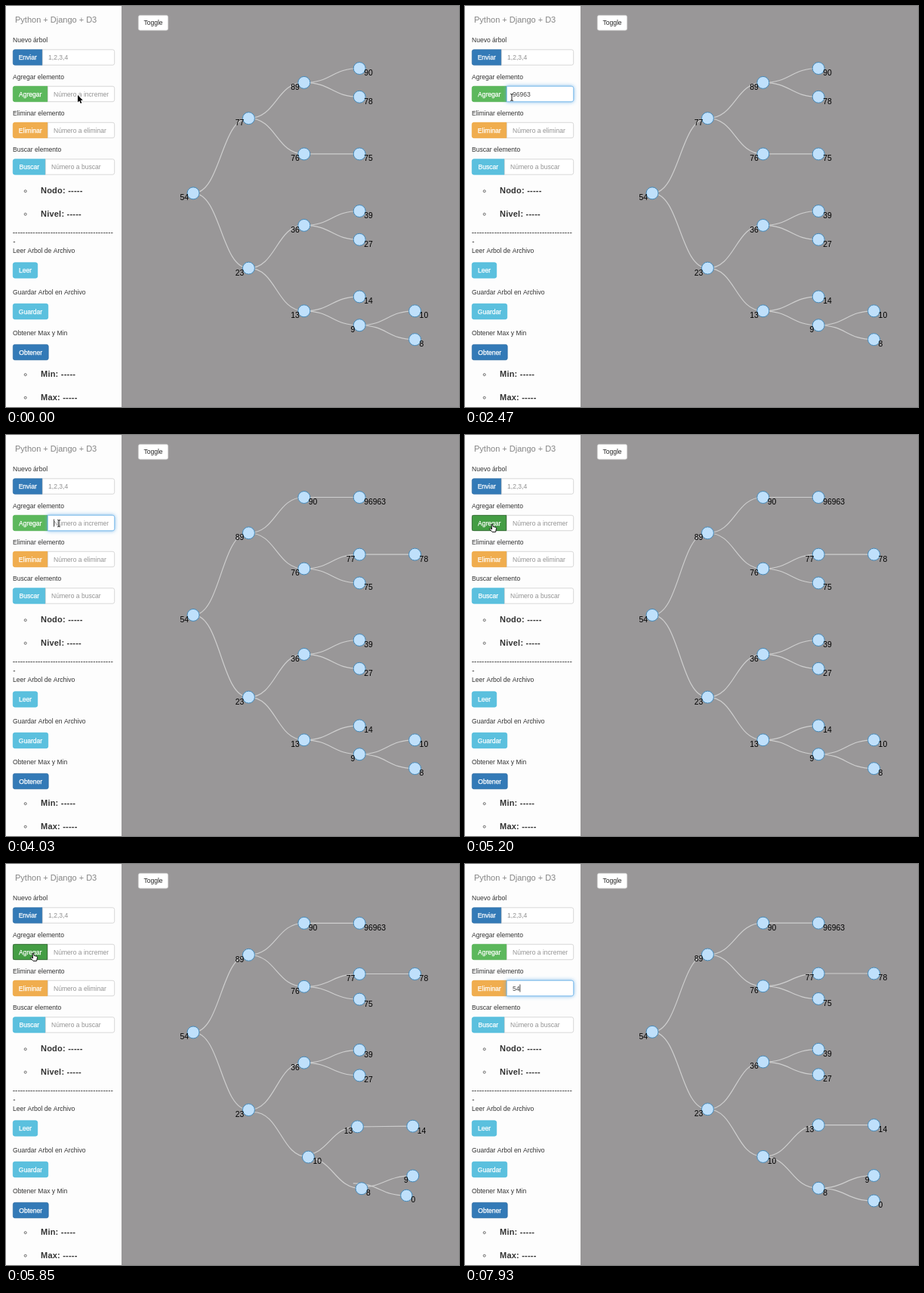
An HTML page with a canvas that plays this animation: 600 by 531 pixels, repeating every 8000 ms.

```html
<!DOCTYPE html>
<html lang="es">
<head>
<meta charset="utf-8">
<title>Árbol binario</title>
<style>
html, body { margin: 0; width: 100%; height: 100%; overflow: hidden; background: #999798; }
canvas { display: block; width: 600px; height: 531px; }
</style>
</head>
<body>
<canvas id="stage"></canvas>
<script>
const W = 600, H = 531, LOOP = 8000, STEP = 130;
const FONT = '"Liberation Sans", Arial, sans-serif';
const SMALL = `8.56px ${FONT}`;
const canvas = document.getElementById('stage');
const ctx = canvas.getContext('2d');
const ratio = window.devicePixelRatio || 1;
canvas.width = W * ratio;
canvas.height = H * ratio;

// Trees: [name, ...children]; a leaf carries its slot on the vertical axis.
const upper = ['89', ['90', ['96963', 0]], ['76', ['77', ['78', 2]], ['75', 3]]];
const middle = ['36', ['39', 5], ['27', 6]];
const lower = ['13', ['14', 8], ['9', ['10', 8.5], ['8', 9.5]]];
const layouts = [
  ['54', ['77', ['89', ['90', 0], ['78', 1]], ['76', ['75', 3]]], ['23', middle, lower]],
  ['54', upper, ['23', middle, lower]],
  ['54', upper, ['23', middle, ['10', ['13', ['14', 8]], ['8', ['9', 10], ['0', 11]]]]]
].map(layoutTree);
const updates = [2704, 5259], DURATION = 750;
const entry = { x: 248, y: 262 };
const leftLabels = new Set(['54', '77', '89', '76', '23', '36', '13', '9']);

function layoutTree(root) {
  const nodes = {};
  let last = 0;
  (function place([name, ...kids], depth, parent) {
    let slot = kids[0];
    if (typeof slot !== 'number') {
      const slots = kids.map(k => place(k, depth + 1, name));
      slot = (slots[0] + slots[slots.length - 1]) / 2;
    }
    last = Math.max(last, slot);
    nodes[name] = { x: 248 + depth * 73.4, slot, parent };
    return slot;
  })(root, 0, null);
  for (const n of Object.values(nodes)) n.y = 44.7 + (n.slot + 1) * 434.7 / (last + 2);
  return nodes;
}

// Form state: [time, focused part, text, focus glow]
const formStates = [
  [0, '', '', false],
  [1040, 'add', '', true],
  ...[1, 2, 3, 4, 5].map(n => [1300 + n * 130, 'add', '96963'.slice(0, n), true]),
  [2730, 'button', '', false],
  [3770, 'add', '', true],
  [4160, 'add', '0', true],
  [5200, 'button', '', false],
  [6630, 'del', '', false],
  [6760, 'del', '', true],
  [7280, 'del', '5', true],
  [7670, 'del', '54', true]
];

// Pointer path: [time, x, y, shape]
const pointerPath = [
  [0, 95, 118, 'arrow'], [390, 95, 118, 'arrow'], [520, 94, 119, 'beam'],
  [780, 92, 119, 'beam'], [1040, 62, 121, 'beam'], [2470, 62, 121, 'beam'],
  [2600, 52, 120, 'hand'], [2730, 42, 120, 'hand'], [3380, 42, 120, 'hand'],
  [3510, 45, 120, 'hand'], [3640, 59, 118, 'beam'], [3770, 70, 117, 'beam'],
  [4420, 70, 117, 'beam'], [4550, 65, 118, 'beam'], [4680, 49, 118, 'hand'],
  [4810, 36, 118, 'hand'], [6110, 36, 118, 'hand'], [6240, 44, 129, 'arrow'],
  [6370, 62, 146, 'arrow'], [6500, 77, 162, 'beam'], [7150, 77, 162, 'none']
];

const lerp = (a, b, p) => a + (b - a) * p;
const mix = (a, b, p) => ({ x: lerp(a.x, b.x, p), y: lerp(a.y, b.y, p) });
const ease = t => t < 0.5 ? 4 * t ** 3 : 1 - 4 * (1 - t) ** 3;
const lastIndex = (list, t) => list.reduce((at, item, i) => item[0] <= t ? i : at, 0);

function text(str, x, y, color, { font = SMALL, align = 'left', spacing = 0, weight = 0 } = {}) {
  ctx.font = font;
  ctx.textAlign = align;
  ctx.letterSpacing = spacing + 'px';
  ctx.fillStyle = color;
  ctx.fillText(str, x, y);
  if (weight) {
    ctx.lineWidth = weight;
    ctx.strokeStyle = color;
    ctx.strokeText(str, x, y);
  }
  ctx.letterSpacing = '0px';
}

function box(x, y, w, h, radii, fill, border) {
  ctx.beginPath();
  ctx.roundRect(x + 0.3, y + 0.3, w - 0.6, h - 0.6, radii);
  ctx.fillStyle = fill;
  ctx.fill();
  ctx.lineWidth = 0.7;
  ctx.strokeStyle = border;
  ctx.stroke();
}

function button(label, y, w, fill, border, radii = 2.5) {
  box(9, y, w, 21, radii, fill, border);
  text(label, 9 + w / 2, y + 13.6, '#fff', { align: 'center', weight: 0.25 });
}

function input(x, y, hint, value, focused, glow, caret) {
  if (glow) {
    ctx.save();
    ctx.shadowColor = 'rgba(102,175,233,.8)';
    ctx.shadowBlur = 5 * ratio;
    box(x, y, 144 - x, 21, [0, 2.5, 2.5, 0], '#fff', '#66afe9');
    ctx.restore();
  }
  box(x, y, 144 - x, 21, [0, 2.5, 2.5, 0], '#fff', glow ? '#66afe9' : '#c8c8c8');
  ctx.save();
  ctx.beginPath();
  ctx.rect(x, y, 136 - x, 21);
  ctx.clip();
  text(value || hint, x + 8, y + 13.6, value ? '#444' : '#929292');
  if (focused && caret) {
    ctx.fillStyle = '#222';
    ctx.fillRect(x + 8 + (value ? ctx.measureText(value).width : 0), y + 5.5, 0.8, 10);
  }
  ctx.restore();
}

function sidebar(t, hover) {
  const [since, focus, value, glow] = formStates[lastIndex(formStates, t)];
  const caret = (t - since) % 1000 < 500;
  const left = [2.5, 0, 0, 2.5];
  const field = (id, x, y, hint) =>
    input(x, y, hint, focus === id ? value : '', focus === id, focus === id && glow, caret);

  ctx.fillStyle = '#fdfdfd';
  ctx.fillRect(0, 0, 153, H);
  text('Python + Django + D3', 12, 21.5, '#858585', { font: `11px ${FONT}` });

  const labels = [['Nuevo árbol', 48], ['Agregar elemento', 96.5], ['Eliminar elemento', 145],
    ['Buscar elemento', 193], ['Leer Arbol de Archivo', 327], ['Guardar Arbol en Archivo', 381.5],
    ['Obtener Max y Min', 436]];
  for (const [label, y] of labels) text(label, 9, y, '#333');

  const active = hover || focus === 'button';
  button('Enviar', 57.5, 39.5, '#337ab7', '#2e6da4', left);
  button('Agregar', 106, 46.5, active ? '#449d44' : '#5cb85c', active ? '#398439' : '#4cae4c', left);
  button('Eliminar', 154, 46.5, '#f0ad4e', '#eea236', left);
  button('Buscar', 202.5, 43.5, '#5bc0de', '#46b8da', left);
  field('new', 48, 57.5, '1,2,3,4');
  field('add', 55, 106, 'Número a incrementar');
  field('del', 55, 154, 'Número a eliminar');
  field('find', 52, 202.5, 'Número a buscar');
  if (focus === 'button') {
    ctx.setLineDash([1, 1]);
    ctx.lineWidth = 0.8;
    ctx.strokeStyle = '#1c401c';
    ctx.strokeRect(9.5, 106.5, 45, 20);
    ctx.setLineDash([]);
  }

  const facts = [['Nodo', 248], ['Nivel', 278.5], ['Min', 491], ['Max', 521.5]];
  for (const [name, y] of facts) {
    text(name + ': -----', 46, y, '#333', { font: `bold 11px ${FONT}`, spacing: 0.22 });
    ctx.beginPath();
    ctx.arc(25.7, y - 2.8, 1.5, 0, 7);
    ctx.lineWidth = 0.7;
    ctx.strokeStyle = '#333';
    ctx.stroke();
  }
  text('-'.repeat(40), 9, 303, '#333', { spacing: 0.48, weight: 0.2 });
  text('-', 9.5, 315, '#333', { weight: 0.2 });

  button('Leer', 339.5, 33, '#5bc0de', '#46b8da');
  button('Guardar', 394, 47, '#5bc0de', '#46b8da');
  button('Obtener', 448, 47.5, '#337ab7', '#2e6da4');
}

function tree(t) {
  const stage = updates.filter(u => u <= t).length;
  const from = layouts[Math.max(0, stage - 1)], to = layouts[stage];
  const p = stage ? ease(Math.min(1, (t - updates[stage - 1]) / DURATION)) : 1;
  const names = Object.keys(to);

  ctx.lineWidth = 1.15;
  ctx.strokeStyle = '#cfcfcf';
  for (const name of names) {
    if (!to[name].parent) continue;
    const old = from[name];
    const a = mix(old ? from[old.parent] : entry, to[to[name].parent], p);
    const b = mix(old || entry, to[name], p);
    const mid = (a.x + b.x) / 2;
    ctx.beginPath();
    ctx.moveTo(a.x, a.y);
    ctx.bezierCurveTo(mid, a.y, mid, b.y, b.x, b.y);
    ctx.stroke();
  }

  for (const name of names) {
    const old = from[name], grow = old ? 1 : p;
    const { x, y } = mix(old || entry, to[name], p);
    ctx.beginPath();
    ctx.arc(x, y, 8 * grow, 0, 7);
    ctx.fillStyle = '#bfe0fb';
    ctx.fill();
    ctx.lineWidth = 1;
    ctx.strokeStyle = '#4689b8';
    ctx.stroke();
    const onLeft = leftLabels.has(name);
    ctx.globalAlpha = grow;
    text(name, x + (onLeft ? -6 : 6), y + 9.4, '#000',
      { font: `10.4px ${FONT}`, align: onLeft ? 'right' : 'left' });
    ctx.globalAlpha = 1;
  }
}

function outline(points, x, y) {
  ctx.beginPath();
  points.forEach(([dx, dy]) => ctx.lineTo(x + dx, y + dy));
  ctx.closePath();
}

const shapes = {
  none() {},
  arrow(x, y) {
    outline([[0, 0], [0, 9.5], [2.2, 7.5], [3.8, 11], [5.3, 10.3], [3.8, 7], [6.7, 6.8]], x, y);
    ctx.lineWidth = 1.4;
    ctx.strokeStyle = '#fff';
    ctx.stroke();
    ctx.fillStyle = '#000';
    ctx.fill();
  },
  beam(x, y) {
    ctx.beginPath();
    for (const s of [-1, 1]) {
      ctx.moveTo(x - 1.8, y + 4.6 * s);
      ctx.quadraticCurveTo(x, y + 4.6 * s, x, y + 3.4 * s);
      ctx.quadraticCurveTo(x, y + 4.6 * s, x + 1.8, y + 4.6 * s);
    }
    ctx.moveTo(x, y - 4);
    ctx.lineTo(x, y + 4);
    ctx.lineWidth = 1;
    ctx.strokeStyle = '#222';
    ctx.stroke();
  },
  hand(x, y) {
    outline([[-1, 0.2], [0.6, 0.2], [1.2, 3.4], [4.8, 4.2], [5.6, 5.4], [4.6, 10.4],
      [0, 10.4], [-3.6, 6.4], [-2.8, 5.4], [-0.4, 6.8]], x, y);
    ctx.lineJoin = 'round';
    ctx.lineWidth = 1;
    ctx.fillStyle = '#fff';
    ctx.strokeStyle = '#111';
    ctx.fill();
    ctx.stroke();
    ctx.lineJoin = 'miter';
  }
};

function pointerAt(t) {
  const i = lastIndex(pointerPath, t);
  const [t0, x, y, shape] = pointerPath[i];
  const [t1, nx, ny] = pointerPath[i + 1] || [t0 + 1, x, y];
  const p = Math.min(1, (t - t0) / (t1 - t0));
  return { x: lerp(x, nx, p), y: lerp(y, ny, p), shape };
}

function draw(now) {
  const t = Math.floor(now % LOOP / STEP) * STEP;
  const pointer = pointerAt(t);
  ctx.setTransform(ratio, 0, 0, ratio, 0, 0);
  ctx.fillStyle = '#999798';
  ctx.fillRect(0, 0, W, H);
  tree(t);
  box(175, 12, 40, 20.5, 2.5, '#fff', '#ccc');
  text('Toggle', 195, 25.3, '#222', { align: 'center' });
  sidebar(t, pointer.shape === 'hand');
  shapes[pointer.shape](pointer.x, pointer.y);
  if (t >= 6630 && t < 6760) {
    ctx.beginPath();
    ctx.arc(pointer.x, pointer.y, 9.2, 0, 7);
    ctx.lineWidth = 1.8;
    ctx.strokeStyle = '#111';
    ctx.stroke();
  }
}

const start = performance.now();
(function loop() {
  draw(performance.now() - start);
  requestAnimationFrame(loop);
})();
</script>
</body>
</html>
```
